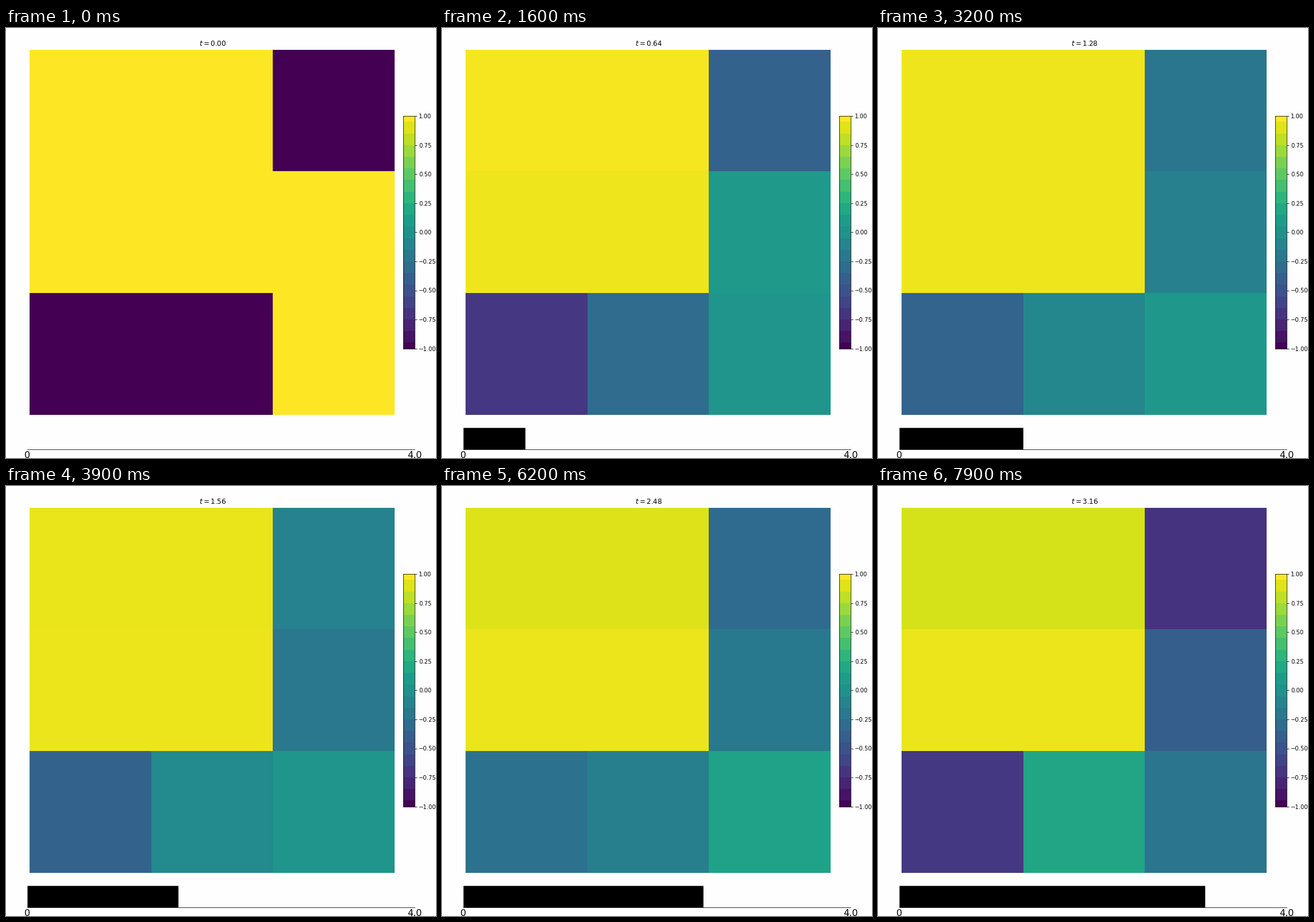
A matplotlib script for the animation above (8000 ms loop, 748 by 748 pixels).

```python
import numpy as np
import matplotlib.pyplot as plt
from matplotlib.animation import FuncAnimation
from matplotlib.patches import Rectangle

SIZE, DPI = 748, 72
FRAMES, INTERVAL, DT = 80, 100, 0.04
T_END = 4.0
SHADES = dict(cmap="viridis", vmin=-1, vmax=1)

plt.rcParams["font.family"] = "DejaVu Sans"


def settle(t, start, level, tau, power=1):
    """Relax from start to level within about tau."""
    return level + (start - level) * np.exp(-((t / tau) ** power))


def swing(t, gain, peak=2.52, period=1.14):
    """Oscillation that grows from nothing."""
    return gain * t * np.cos(2 * np.pi * (t - peak) / period)


def grid(t):
    top = 1 - 0.042 * t
    mid = settle(t, 1, 0.945, 0.25)
    top_right = settle(t, -1, -0.3, 0.17) + swing(t, 0.13, 1.75, 2.86)
    mid_right = settle(t, 1, -0.3, 0.53) + swing(t, 0.04)
    low_left = settle(t, -1, -0.44, 0.65, 2) + swing(t, 0.08)
    low_mid = settle(t, -1, 0, 0.6, 2) + swing(t, -0.06)
    low_right = settle(t, 1, -0.02, 0.26) + swing(t, 0.07)
    return np.array([
        [top, top, top_right],
        [mid, mid, mid_right],
        [low_left, low_mid, low_right],
    ])


fig = plt.figure(figsize=(SIZE / DPI, SIZE / DPI), dpi=DPI, facecolor="#fefefe")

# Full-stage axes in pixel units, y pointing down
ax = fig.add_axes([0, 0, 1, 1])
ax.set(xlim=(0, SIZE), ylim=(SIZE, 0))
ax.axis("off")

mesh = ax.pcolormesh(np.linspace(40.6, 676.4, 4), np.linspace(37.55, 673, 4),
                     grid(0), antialiased=False, **SHADES)
title = ax.text(359.6, 31.4, "", size=12, ha="center", va="baseline")

# Progress bar
X0, X1 = 0.05 * SIZE, 0.95 * SIZE
bar = Rectangle((X0, 0.93 * SIZE), 0, 0.05 * SIZE, fc="black", lw=0, snap=False)
ax.add_patch(bar)
ax.plot([X0, X1], [0.98 * SIZE] * 2, color="black", lw=0.8)
for x, label in ((X0, "0"), (X1, "4.0")):
    ax.text(x, 736.5, label, size=16, ha="center", va="top")

# Colour scale in steps of 0.1
LEFT, TOP, WIDTH, HEIGHT = 690.9, 153.2, 20.2, 404.4
cax = fig.add_axes([LEFT / SIZE, 1 - (TOP + HEIGHT) / SIZE, WIDTH / SIZE, HEIGHT / SIZE])
steps = np.linspace(-1, 1, 21)
cax.pcolormesh([0.5], steps, steps[:, None], shading="nearest", **SHADES)
cax.pcolormesh([0, 1], np.append(steps - 0.05, 1.05), steps[:, None], **SHADES)
cax.set(xlim=(0, 1), ylim=(-1, 1), xticks=[], yticks=np.linspace(-1, 1, 9))
cax.yaxis.tick_right()
cax.yaxis.set_major_formatter("{x:.2f}")
cax.tick_params(labelsize=10)


def update(i):
    t = i * DT
    mesh.set_array(grid(t))
    title.set_text(f"$t = {t:.2f}$")
    bar.set_width((X1 - X0) * t / T_END)
    return mesh, title, bar


anim = FuncAnimation(fig, update, frames=FRAMES, interval=INTERVAL, repeat=True,
                     repeat_delay=0)
plt.show()
```
